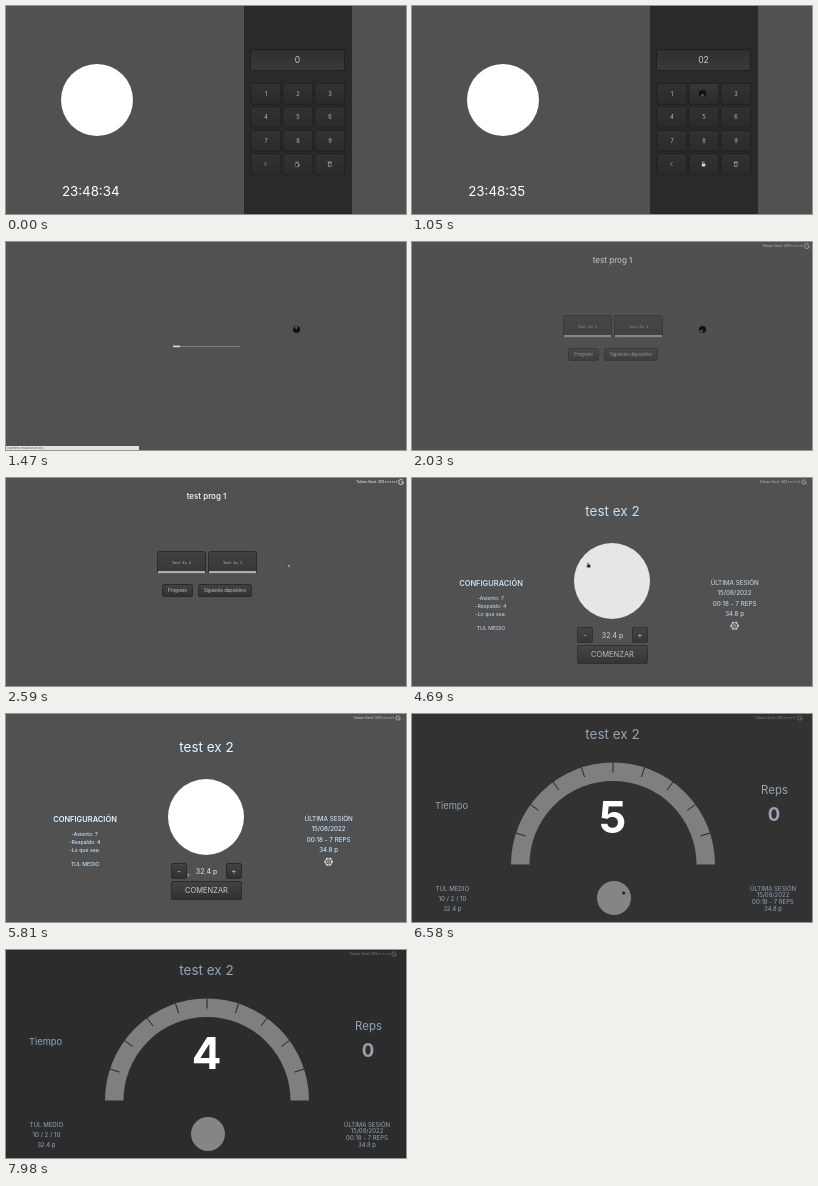
An HTML page with a canvas that plays this animation: 400x208 px, repeating every 8 s.

```html
<!DOCTYPE html>
<html lang="es">
<head>
<meta charset="utf-8">
<title>Entrenamiento</title>
<style>
  html, body { margin: 0; width: 100%; height: 100%; overflow: hidden; background: #515151; }
  canvas { display: block; width: 400px; height: 208px; }
</style>
</head>
<body>
<canvas id="stage"></canvas>
<script>
const W = 400, H = 208, LOOP = 8000;
const canvas = document.getElementById('stage');
const ctx = canvas.getContext('2d');
const dpr = window.devicePixelRatio || 1;
canvas.width = W * dpr;
canvas.height = H * dpr;

const USER = 'Tobías Verel (412*****)';
const SANS = 'Inter, sans-serif';
const MONO = '"DejaVu Sans Mono", monospace';

const clamp = v => Math.min(1, Math.max(0, v));
const ramp = (t, a, b) => clamp((t - a) / (b - a));
const ease = p => p * p * (3 - 2 * p);
const mix = (a, b, p) => a + (b - a) * p;
const grey = (v, alpha = 1) => `rgba(${v},${v},${v},${alpha})`;

function rect(x, y, w, h, fill) {
  ctx.fillStyle = fill;
  ctx.fillRect(x, y, w, h);
}

function disc(x, y, r, fill) {
  ctx.fillStyle = fill;
  ctx.beginPath();
  ctx.arc(x, y, r, 0, Math.PI * 2);
  ctx.fill();
}

function stroke(points, color, width = 1) {
  ctx.strokeStyle = color;
  ctx.lineWidth = width;
  ctx.beginPath();
  points.forEach(([x, y]) => ctx.lineTo(x, y));
  ctx.stroke();
}

function text(str, x, y, size, opt = {}) {
  const { color = '#fff', weight = 400, align = 'center', family = SANS, glow } = opt;
  ctx.save();
  ctx.font = `${weight} ${size}px ${family}`;
  ctx.textAlign = align;
  ctx.textBaseline = 'alphabetic';
  ctx.fillStyle = color;
  if (glow) {
    ctx.shadowColor = glow;
    ctx.shadowBlur = 1.5 * dpr;
    ctx.shadowOffsetX = ctx.shadowOffsetY = dpr;
  }
  ctx.fillText(str, x, y + size * 0.36);
  ctx.restore();
}

function box(x, y, w, h, top, bottom, edge, radius = 1.5) {
  const fill = ctx.createLinearGradient(0, y, 0, y + h);
  fill.addColorStop(0, top);
  fill.addColorStop(1, bottom);
  ctx.fillStyle = fill;
  ctx.strokeStyle = edge;
  ctx.lineWidth = 1;
  ctx.beginPath();
  ctx.roundRect(x + 0.5, y + 0.5, w - 1, h - 1, radius);
  ctx.fill();
  ctx.stroke();
}

function button(label, x, y, w, h, size, color = '#ccc') {
  box(x, y, w, h, '#434343', '#303030', '#2b2b2b');
  text(label, x + w / 2, y + h / 2, size, { color });
}

function userTag(right, color, r) {
  text(USER, right, 4, 3.5, { align: 'right', color });
  ctx.strokeStyle = color;
  ctx.lineWidth = 0.7;
  ctx.beginPath();
  ctx.arc(right + 4, 4, r, 0, Math.PI * 1.75);
  ctx.stroke();
  stroke([[right + 4, 4], [right + 4 + r, 4]], color, 0.7);
}

// Screens

function login(t) {
  rect(238, 0, 108, H, '#2a2a2a');
  disc(91, 94, 36, '#fff');
  text(t < 420 ? '23:48:34' : '23:48:35', 84.7, 185.6, 13.3);

  box(244, 43, 95, 22, '#2f2f2f', '#3a3a3a', '#202020');
  text(t < 700 ? '0' : '02', 291.5, 54, 8.6, { color: '#ccc' });

  for (let i = 0; i < 12; i++) {
    const x = 244.3 + (i % 3) * 32, y = 77 + Math.floor(i / 3) * 23.4;
    const hover = i === 1 && t > 560;
    box(x, y, 31, 22, hover ? '#393939' : '#323232', '#2a2a2a', '#212121');
    if (i < 9) text(String(i + 1), x + 15.7, y + 11, 5.6, { color: '#bbb' });
  }
  stroke([[260.5, 156], [258.5, 158], [260.5, 160]], '#bbb', 0.6);
  rect(289.9, 157.6, 3.4, 2.8, '#ddd');
  stroke([[290.5, 157.6], [290.5, 156], [292.5, 156]], '#ddd', 0.6);
  ctx.strokeStyle = '#bbb';
  ctx.strokeRect(322.3, 156.7, 2.8, 3.6);
  stroke([[321.6, 156], [325.8, 156]], '#bbb', 0.6);
}

function loading(t) {
  rect(167, 104, 67, 1, '#7d7d7d');
  rect(167, 103.6, mix(7, 67, ramp(t, 1470, 1900)), 1.6, '#dcdcdc');
  rect(0, 204, 133, 4, '#e2e2e2');
  text('Esperando respuesta del sitio…', 1, 206, 2.6, { align: 'left', color: '#555' });
}

function program() {
  userTag(391, '#fff', 2.5);
  text('test prog 1', 200.5, 18, 8, { weight: 500 });
  ['Test Ex 2', 'Test Ex 1'].forEach((label, i) => {
    const x = 151 + i * 51;
    box(x, 73, 49, 23, '#414141', '#373737', '#2b2b2b', 2);
    rect(x + 1, 93, 47, 2.4, '#adadad');
    text(label, x + 24.5, 84.5, 3.5, { family: MONO, color: '#ccc' });
  });
  button('Progreso', 156, 106, 31, 13, 4.4);
  button('Siguiente dispositivo', 192, 106, 54, 13, 4.3);
}

function gear(x, y) {
  for (let i = 0; i < 6; i++) {
    const a = i * Math.PI / 3, c = Math.cos(a), s = Math.sin(a);
    stroke([[x + c * 3, y + s * 3], [x + c * 4.3, y + s * 4.3]], '#ddd', 2);
  }
  ctx.lineWidth = 1;
  ctx.beginPath();
  ctx.arc(x, y, 3.2, 0, Math.PI * 2);
  ctx.stroke();
  ctx.lineWidth = 0.7;
  ctx.beginPath();
  ctx.arc(x, y, 1.3, 0, Math.PI * 2);
  ctx.stroke();
}

function lastSession(x, ys, size, style) {
  ['ÚLTIMA SESIÓN', '15/08/2022', '00:18 - 7 REPS', '34.8 p']
    .forEach((line, i) => text(line, x, ys[i], size, style));
}

function exercise() {
  const style = { color: '#f4f4f4', glow: '#24577d' };
  userTag(388, '#ccc', 2.2);
  text('test ex 2', 200.5, 33.5, 13.5, style);
  disc(200, 103, 38, '#fff');
  text('CONFIGURACIÓN', 79, 105.7, 7.5, { ...style, weight: 600 });
  ['-Asiento: 7', '-Respaldo: 4', '-Lo que sea.']
    .forEach((line, i) => text(line, 78.7, 120 + i * 8, 5.2, style));
  text('TUL MEDIO', 79, 150, 5.2, style);
  lastSession(322.6, [105, 115, 125.5, 136], 6.3, style);
  gear(322.6, 147.8);
  button('-', 165, 149, 16, 16, 8);
  button('+', 220, 149, 16, 16, 8);
  text('32.4 p', 200.5, 157, 7, { color: '#eee' });
  button('COMENZAR', 165, 167, 71, 19, 7.5);
}

function workout(t) {
  const style = { color: '#a0a2a5', glow: '#1c344b' };
  userTag(384, '#808080', 2.2);
  text('test ex 2', 200.5, 20.5, 13.5, style);

  ctx.strokeStyle = '#7f7f7f';
  ctx.lineWidth = 18.5;
  ctx.beginPath();
  ctx.arc(201, 150.5, 92.75, Math.PI, Math.PI * 2);
  ctx.stroke();
  for (let i = 1; i < 10; i++) {
    const a = i * Math.PI / 10, c = Math.cos(a), s = Math.sin(a);
    stroke([[201 + c * 92, 150.5 - s * 92], [201 + c * 102, 150.5 - s * 102]], '#222', 1);
  }

  text(t < 7420 ? '5' : '4', 200.7, 103, 44, { weight: 700 });
  text('Tiempo', 39.5, 91.3, 9.3, style);
  text('Reps', 362.5, 76, 11.4, style);
  text('0', 362, 100.7, 18.5, { ...style, weight: 700 });
  text('TUL MEDIO', 40.3, 174.5, 6.1, style);
  text('10 / 2 / 10', 40.5, 185, 6.2, style);
  text('32.4 p', 40.3, 195.3, 6, style);
  lastSession(361, [174.5, 181.3, 188.2, 195.2], 6, style);
  disc(202, 184, 17, '#858585');
}

// Pointer

const path = [
  [0, 290, 156], [150, 290, 156], [560, 290, 86], [2170, 290, 86],
  [2350, 284, 87], [2590, 282, 86], [2750, 240, 126], [2860, 162, 122],
  [2940, 178, 98], [3150, 228, 98], [3400, 205, 80], [3640, 176, 83],
  [5390, 176, 86], [5600, 165, 130], [5810, 181.5, 159], [6160, 205, 176],
  [6500, 211, 176], [LOOP, 211, 176]
];

function pointerAt(t) {
  const i = path.findIndex(([time]) => time > t);
  const [t0, x0, y0] = path[i - 1], [t1, x1, y1] = path[i];
  const p = ease(ramp(t, t0, t1));
  return [mix(x0, x1, p), mix(y0, y1, p)];
}

function outline(points, x, y, fill, edge) {
  ctx.beginPath();
  points.forEach(([dx, dy]) => ctx.lineTo(x + dx, y + dy));
  ctx.closePath();
  ctx.fillStyle = fill;
  ctx.fill();
  ctx.strokeStyle = edge;
  ctx.lineWidth = 0.5;
  ctx.stroke();
}

const ARROW = [[0, 0], [0, 3.4], [0.9, 2.7], [1.5, 3.9], [2.1, 3.6], [1.6, 2.4], [2.5, 2.3]];
const HAND = [[-0.5, 0], [0.5, 0], [0.6, 1.6], [2.4, 2], [2.2, 4.6], [-0.5, 4.6], [-1.6, 2.7], [-0.5, 2.8]];

function spinner(x, y, t) {
  const a = t / 900 * Math.PI * 2;
  disc(x, y, 3.6, '#111');
  ctx.fillStyle = '#666';
  ctx.beginPath();
  ctx.moveTo(x, y);
  ctx.arc(x, y, 3, a, a + 1.1);
  ctx.fill();
}

function pointer(t) {
  if (t >= 7420) return;
  const [x, y] = pointerAt(t);
  const overPage = (t >= 2100 && t < 2900) || (t >= 4760 && t < 5950);
  if (t >= 910 && t < 2100) spinner(290.5, 87.5, t);
  else if (overPage) outline(ARROW, x, y, '#ddd', '#333');
  else outline(HAND, x, y, '#111', '#999');
}

// Start, end, length of fade-in, length of fade-out
const scenes = [
  [0, 1330, 0, 0, login],
  [1330, 1930, 0, 0, loading],
  [1930, 4400, 170, 180, program],
  [4400, 6370, 340, 140, exercise],
  [6370, LOOP, 190, 0, workout]
];

function draw(t) {
  const shade = Math.round(mix(0x51, 0x2c, ramp(t, 6230, 6650)));
  const [start, end, fadeIn, fadeOut, paint] = scenes.find(s => t < s[1]);
  ctx.setTransform(dpr, 0, 0, dpr, 0, 0);
  rect(0, 0, W, H, grey(shade));
  paint(t);
  const shown = Math.min(
    fadeIn ? ramp(t, start, start + fadeIn) : 1,
    fadeOut ? 1 - ramp(t, end - fadeOut, end) : 1
  );
  if (shown < 1) rect(0, 0, W, H, grey(shade, 1 - shown));
  pointer(t);
}

const origin = performance.now();
function tick() {
  draw((performance.now() - origin) % LOOP);
  requestAnimationFrame(tick);
}
tick();
</script>
</body>
</html>
```
